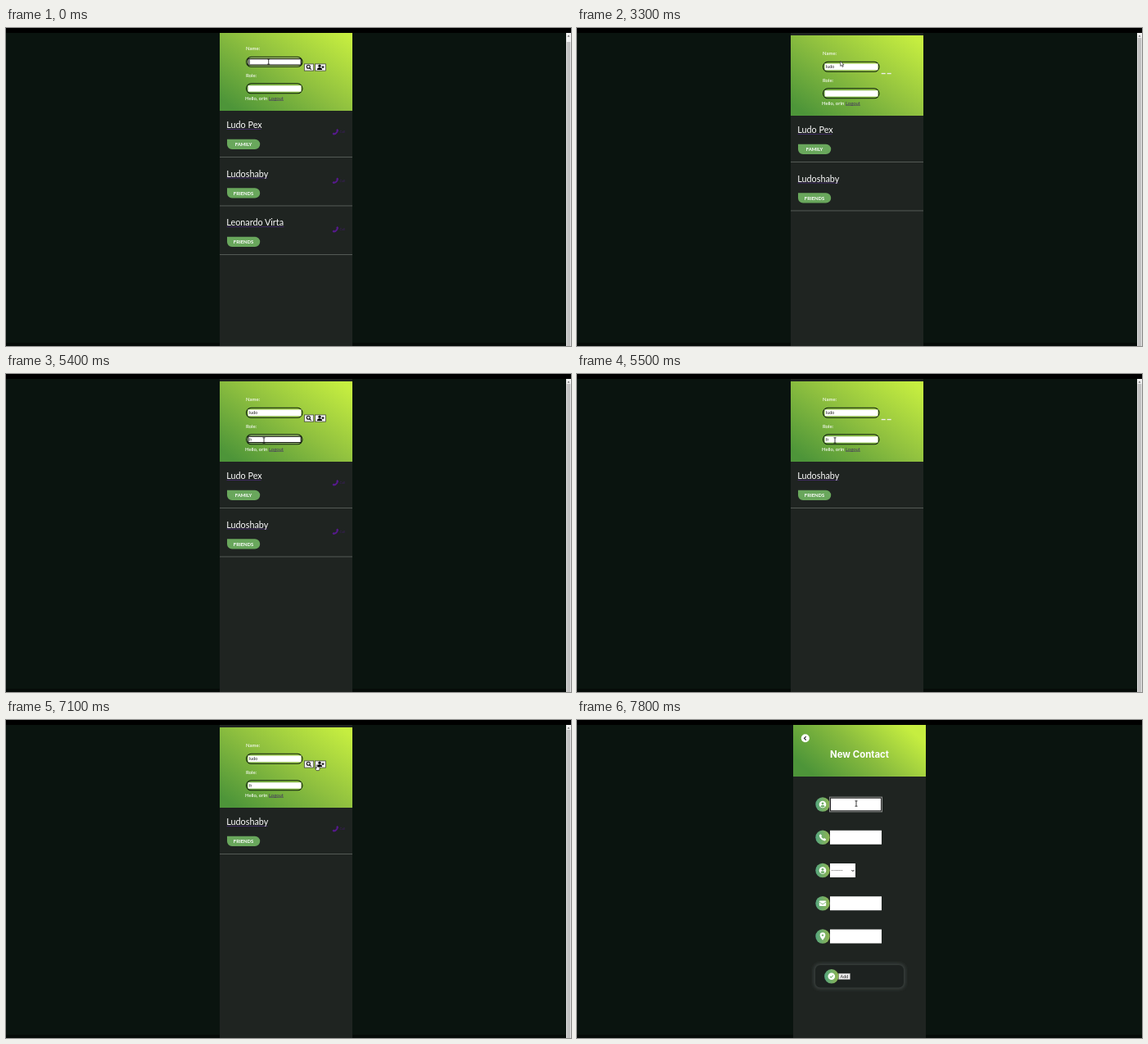
Recreate the animation shown at these times as an HTML page. Size 690 px wide and 388 px high, loop 8000 ms.

```html
<!DOCTYPE html>
<html lang="en">
<head>
<meta charset="utf-8">
<title>Contacts</title>
<style>
  html, body { margin: 0; width: 100%; height: 100%; overflow: hidden; background: #000; }
  svg { display: block; }
  text { font-family: Lato, "Open Sans", sans-serif; fill: #fff; }
  .label { font-size: 6px; font-weight: 500; }
  .name { font-size: 10.8px; }
  .badge { font-size: 5.85px; font-weight: 700; text-anchor: middle; }
  .title { font: 700 11.4px Inter, sans-serif; text-anchor: middle; }
  .input { font: 5.4px "Liberation Sans", Arial, sans-serif; fill: #222; }
  .call { font-size: 4px; fill: #3f1c62; }
  .logout { font-size: 5.9px; fill: #46365f; }
</style>
</head>
<body>
<svg width="690" height="388" viewBox="0 0 690 388">
  <defs>
    <linearGradient id="lime" gradientUnits="userSpaceOnUse" x1="300" y1="120" x2="388" y2="-6">
      <stop offset="0" stop-color="#4d9539"/>
      <stop offset=".5" stop-color="#8fc03f"/>
      <stop offset="1" stop-color="#c6ee40"/>
    </linearGradient>
    <linearGradient id="lime2" gradientUnits="userSpaceOnUse" x1="306" y1="82" x2="384" y2="-8">
      <stop offset="0" stop-color="#4d9539"/>
      <stop offset=".5" stop-color="#88bb3e"/>
      <stop offset="1" stop-color="#c6ee40"/>
    </linearGradient>
    <linearGradient id="disc">
      <stop offset="0" stop-color="#55a67e"/>
      <stop offset="1" stop-color="#8fb552"/>
    </linearGradient>
    <filter id="glow" x="-20%" y="-50%" width="140%" height="200%"><feGaussianBlur stdDeviation="2.2"/></filter>
    <clipPath id="view"><rect y="6" width="690" height="382"/></clipPath>
    <path id="phone" d="M-4.5-7.5-1.5-3.5-3.2-1.8Q-1.8 1 1.8 3L3.5 1.4 7.5 4.2Q7 7.5 4 7.6-2 7-5.5 1.5-8-3-7.5-5Z"/>
    <g id="user"><circle cy="-1.5" r="1.6"/><path d="M-3 3.2Q-3 .6 0 .6T3 3.2Z"/></g>
    <g id="person"><circle r="4.3" fill="#fff"/><g fill="#6fae68"><circle cy="-1.2" r="1.4"/><path d="M-2.6 2.5Q-2.2.8 0 .8T2.6 2.5Q0 4.4-2.6 2.5Z"/></g></g>
    <g id="mail"><rect x="-4.2" y="-3.2" width="8.4" height="6.4" rx="1" fill="#fff"/><path d="M-4.2-1.8 0 1.2 4.2-1.8" fill="none" stroke="#6fae68" stroke-width=".8"/></g>
    <g id="pin"><path d="M0 4.8Q-3.3.8-3.3-1.4A3.3 3.3 0 0 1 3.3-1.4Q3.3.8 0 4.8Z" fill="#fff"/><circle cy="-1.4" r="1.2" fill="#6fae68"/></g>
    <g id="check"><circle r="4.3" fill="#fff"/><path d="M-1.9.1-.5 1.5 2-1.3" fill="none" stroke="#6fae68" stroke-width="1.1"/></g>
    <path id="beam" d="M-1.5-3.2H1.5M0-3.2V3.2M-1.5 3.2H1.5" fill="none" stroke="#111" stroke-width=".8"/>
    <path id="arrow" d="M0 0V6L1.5 4.8 2.5 7 3.5 6.5 2.5 4.4H4.3Z" fill="#fff" stroke="#111" stroke-width=".6"/>
    <path id="hand" d="M-.7-3Q0-3.7.6-3V-.9L3-.3V2L2.3 3.6H-.9L-2.6 1-.7 1Z" fill="#fff" stroke="#111" stroke-width=".6"/>
  </defs>
  <rect y="6" width="690" height="382" fill="#0a140f"/>
  <rect y="384" width="690" height="4" fill="#060c09"/>
  <g id="scene" clip-path="url(#view)"></g>
</svg>
<script>
const LOOP = 8000;
const contacts = [['Ludo Pex', 'FAMILY', 42], ['Ludoshaby', 'FRIENDS', 50], ['Leonardo Virta', 'FRIENDS', 70]];
const nameKeys = [[0, ''], [800, 'lu'], [1300, 'lud'], [1900, 'ludo']];
const roleKeys = [[0, ''], [4600, 'f'], [4900, 'fr']];
// time, x, y of the pointer
const route = [[0, 320.7, 41], [100, 322.7, 42], [3000, 322.7, 41.5], [3850, 322.7, 41.5], [4400, 315, 81],
  [6350, 315, 81], [7050, 380, 58], [7250, 380, 58], [7700, 341, 102], [8000, 341, 102]];
const carets = [[0, 500], [800, 2500], [2800, 3000], [4400, 5200]];

const within = (t, a, b) => t >= a && t < b;
const typed = (keys, t) => keys.filter(k => k[0] <= t).pop()[1];
const rect = (x, y, w, h, fill, more = '') => `<rect x="${x}" y="${y}" width="${w}" height="${h}" fill="${fill}" ${more}/>`;
const text = (x, y, cls, s) => `<text x="${x}" y="${y}" class="${cls}">${s}</text>`;
const use = (id, x, y, more = '') => `<use href="#${id}" transform="translate(${x} ${y}) ${more}"/>`;
const group = (x, y, s) => `<g transform="translate(${x} ${y})">${s}</g>`;

function pointerAt(t) {
  const i = route.findIndex(p => p[0] > t);
  const [a, b] = [route[i - 1], route[i]];
  const u = (t - a[0]) / (b[0] - a[0]);
  const k = u * u * (3 - 2 * u);
  return [a[1] + (b[1] - a[1]) * k, a[2] + (b[2] - a[2]) * k];
}

function pointer(t) {
  const [x, y] = pointerAt(t);
  if (within(t, 7000, 7200)) return use('hand', x, y);
  const beam = t < 3000 || within(t, 4250, 6450) || t >= 7600;
  return beam ? use('beam', x, y) : use('arrow', x - 1, y - 1);
}

function field(y, value, focused, caret) {
  const end = 297 + [...value].reduce((w, c) => w + ('lfr'.includes(c) ? 1.4 : 3), 0);
  return rect(293.5, y, 68.5, 12, focused ? '#ffffff40' : 'none', 'rx="6" stroke="#10200c" stroke-width="1.1"') +
    rect(295.8, y + 2.4, 64.4, 7.4, '#fff', focused ? 'stroke="#111" stroke-width="1.1"' : 'stroke="#d5dfc8" stroke-width=".5"') +
    text(297, y + 7.9, 'input', value) +
    (caret ? rect(end + .2, y + 3.2, .6, 5.8, '#111') : '');
}

function buttons() {
  const box = (x, w) => rect(x, 49.9, w, 8.2, '#efefef', 'stroke="#333" stroke-width=".7"');
  return box(364.3, 11.4) + box(377.5, 13) +
    '<circle cx="369.3" cy="53.3" r="2" fill="none" stroke="#111" stroke-width="1.1"/>' +
    '<path d="M370.8 54.8 372.6 56.6M387 52.2V55M385.6 53.6H388.4" stroke="#111" stroke-width="1.1"/>' +
    use('user', 383, 53.7);
}

function row([name, role, width], i, icons) {
  return group(0, i * 59.5,
    rect(269.5, 129.2, width, .7, '#4d2d7d') + text(269.3, 128.3, 'name', name) +
    '<path d="M270 141.7H304A6.2 6.2 0 0 1 304 154.1H276A6 6 0 0 1 270 148Z" fill="#69a75c"/>' +
    text(290, 150, 'badge', role) +
    rect(261, 163, 162, .9, '#5b605c') +
    (icons ? `<g fill="#551a8b">${use('phone', 402.3, 132.7, 'scale(-.5 .5)')}</g>` + text(407.5, 134, 'call', 'Call') : ''));
}

function listPage(t) {
  const scrolled = t < 3300;
  const icons = !within(t, 3300, 3700) && !within(t, 5500, 5700);
  const shown = scrolled ? contacts : t < 5500 ? contacts.slice(0, 2) : contacts.slice(1, 2);
  const caret = carets.some(([a, b]) => within(t, a, b));
  const roleFocus = within(t, 4400, 5500);
  const form = text(293, 33.3, 'label', 'Name:') + field(41.3, typed(nameKeys, t), scrolled, scrolled && caret) +
    text(293, 65.7, 'label', 'Role:') + field(73.8, typed(roleKeys, t), roleFocus, roleFocus && caret) +
    text(292, 93.7, 'label', 'Hello, orin') + text(321, 93.7, 'logout', 'Logout') +
    rect(321, 94.4, 18, .5, '#46365f');
  const strips = rect(371.7, 54.9, 5, 1.3, '#eee') + rect(378.7, 54.9, 5, 1.3, '#eee');
  const thumb = scrolled ? 17 : 12;
  return rect(261, 6, 162, 382, '#1f2421') +
    group(0, scrolled ? -6 : 0,
      rect(261, 9, 162, 98, 'url(#lime)') + group(icons ? 0 : 7, 0, form) +
      (icons ? buttons() : strips) + shown.map((c, i) => row(c, i, icons)).join('')) +
    rect(684, 6, 6, 382, '#f1f1f1') + rect(684.7, thumb, 4.6, 388 - thumb, '#c1c1c1') +
    '<path d="M685.5 10.5H688.5L687 8.8Z" fill="#555"/>';
}

function formPage(t) {
  const icons = t >= 7300;
  const focused = t >= 7650;
  const disc = (x, y, id, more) => icons ? `<circle cx="${x}" cy="${y}" r="8.7" fill="url(#disc)"/><g fill="#fff">${use(id, x, y, more)}</g>` : '';
  const lines = ['person', 'phone', 'person', 'mail', 'pin'].map((id, i) => {
    const y = 103 + i * 40.25;
    return rect(309, y - 8.5, i === 2 ? 31 : 63, 17, '#fff') + disc(300, y, id, id === 'phone' ? 'scale(.55)' : '');
  }).join('');
  return rect(264, 6, 162, 382, '#1f2421') + rect(264, 6, 162, 63, 'url(#lime2)') +
    (icons ? '<circle cx="278.8" cy="22.3" r="5" fill="#fff"/><path d="M279.7 20.1 277.5 22.3 279.7 24.5" fill="none" stroke="#222" stroke-width="1.1"/>' : '') +
    text(345, 46.2, 'title', 'New Contact') + lines +
    (focused ? rect(309, 94.6, 63, 16.8, 'none', 'stroke="#8a8d8b" stroke-width="2"') + rect(309.5, 95.1, 62, 15.8, 'none', 'stroke="#151515" stroke-width=".9"') : '') +
    text(310.3, 185.4, 'input', '--------') + '<path d="M335.4 183 336.9 184.6 338.4 183" fill="none" stroke="#111" stroke-width=".9"/>' +
    rect(289.5, 297.5, 111, 30.5, '#3d4543', 'rx="7" filter="url(#glow)"') + rect(291, 299, 108, 27.5, '#1d2220', 'rx="6"') +
    rect(319.5, 309.2, 14, 7.3, '#efefef', 'stroke="#888" stroke-width=".5"') + text(321.6, 314.8, 'input', 'Add') +
    disc(310.8, 312.8, 'check');
}

const scene = document.getElementById('scene');
let last = '';
function frame() {
  const t = performance.now() % LOOP;
  const next = (t < 7200 ? listPage(t) : formPage(t)) + pointer(t);
  if (next !== last) scene.innerHTML = last = next;
  requestAnimationFrame(frame);
}
frame();
</script>
</body>
</html>
```
